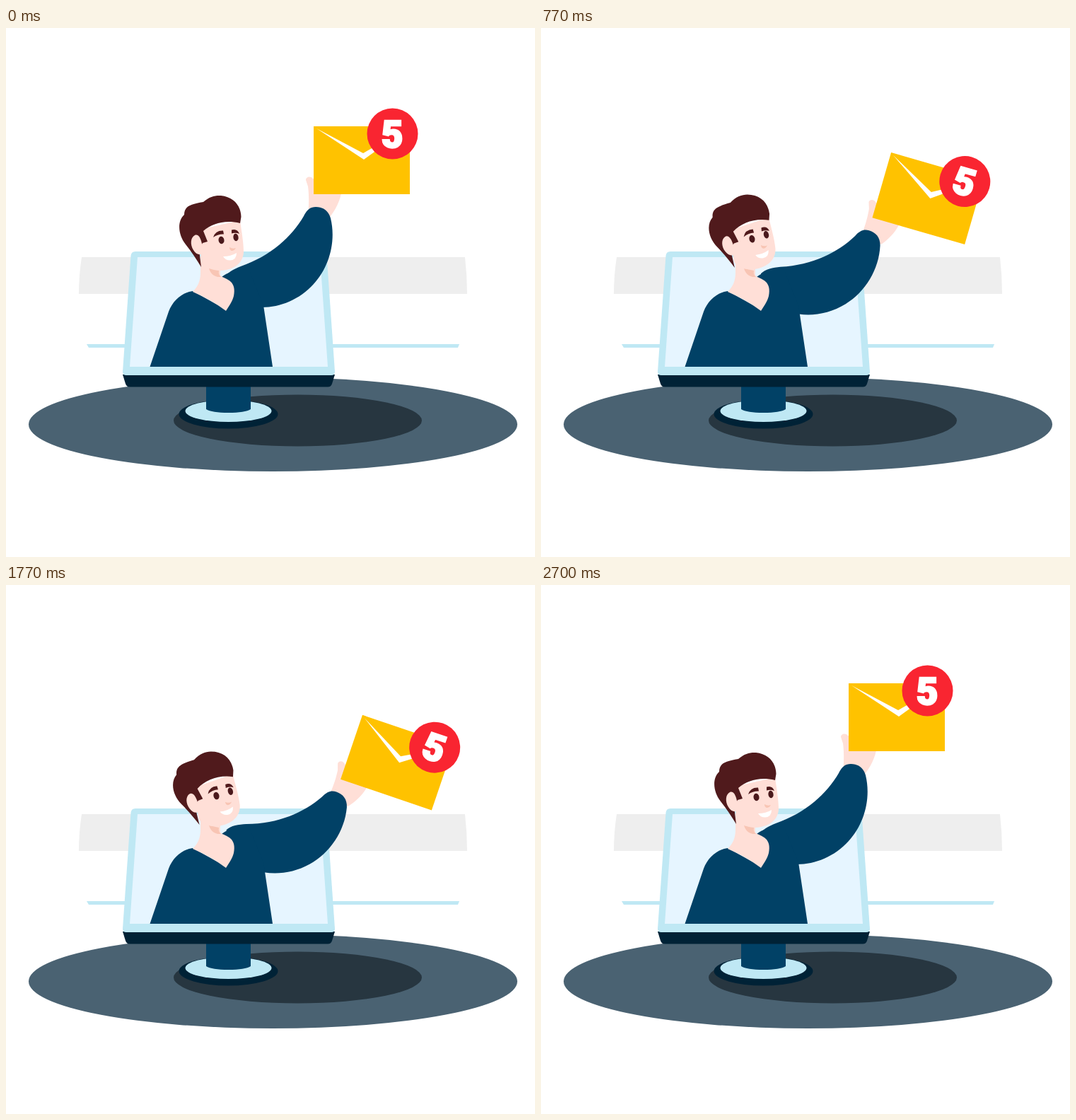
Write an HTML page that moves like this. It is 748 by 748 pixels and loops after 2730 ms.

```html
<!DOCTYPE html>
<html lang="en">
<head>
<meta charset="utf-8">
<title>New mail</title>
<style>
  html, body { margin: 0; width: 100%; height: 100%; overflow: hidden; background: #fff; }
  svg { display: block; width: 100%; height: 100%; }
  .navy { fill: #014166; }
  .ink { fill: #002236; }
  .ice { fill: #bfe8f4; }
  .skin { fill: #ffdfd7; }
  .blush { fill: #f8c5b4; }
  .hair { fill: #501a1c; }
  text { font: 900 53px Roboto, "Open Sans", sans-serif; text-anchor: middle; fill: #fff; stroke: #fff; stroke-width: 2.5px; }
</style>
</head>
<body>
<svg viewBox="0 0 748 748">
  <!-- Room -->
  <path fill="#eee" d="M107 324H649Q652 350 652 376H103Q103 350 107 324Z"/>
  <path class="ice" d="M114 447H641L639 452H117Z"/>
  <ellipse cx="377.5" cy="560.5" rx="345.5" ry="66.5" fill="#4a6272"/>
  <ellipse cx="412.5" cy="555" rx="175.5" ry="36.5" fill="#273640"/>

  <!-- Monitor -->
  <ellipse class="ink" cx="314.5" cy="546" rx="70" ry="20.5"/>
  <ellipse class="ice" cx="314.5" cy="541.5" rx="61" ry="15.5"/>
  <path class="navy" d="M283 505H346V539Q338 544 314.5 544T283 539Z"/>
  <path class="ink" d="M165 490H465L461 503Q459.500 507.500 455 507.500H175Q170.500 507.500 169 503Z"/>
  <path class="ice" d="M183 316H447Q453 316 453.500 322L465 486Q465 491 460 491H170Q165 491 165 486L176.500 322Q177 316 183 316Z"/>
  <path fill="#e6f5ff" d="M186 324H444L455 479H175Z"/>

  <!-- Raised arm with the envelope -->
  <g id="hand">
    <path class="skin" d="M424 215C424 210 431 209 434 213L440 215V234H474C471 248 465 258 458 267L440 275L427 264C429 245 428 232 427 224Z"/>
    <path fill="#ffc200" d="M435 139H571V235H435Z"/>
    <path fill="#fff" d="M439 142L505 177L567 142L506 186Z"/>
    <circle cx="546.500" cy="149.500" r="36" fill="#f92531"/>
    <text x="546" y="168.500">5</text>
  </g>
  <path id="sleeve" class="navy" d="M308 354C312 346 322 341 332 337C375 322 404 295 421 266C426 256 431 253 438 253C448 253 456 258 459 269C467 302 457 338 435 362C415 384 388 395 362 395L330 395Z"/>

  <!-- Torso and neck -->
  <path class="navy" d="M264 372C249 374 236 385 230 401L203.500 479H377L364 392L345 345H319Q311 347 305 352L311 398Z"/>
  <path class="skin" d="M275 322V346C275 358 271 366 264 373Q290 384 311 400C316 392 320 387 322 379C324 369 322 363 318 359C313 354 306 353 303 350V335Z"/>
  <path class="blush" d="M287 340L301 343Q300 349 304 352Q291 353 287 340Z"/>

  <g id="head">
    <path class="skin" d="M274 285L331 272C333 288 336 302 336 317C335 333 322 342 304 343C292 343 282 339 276 330Z"/>
    <path class="hair" d="M252 264C252 252 261 249 279 246C288 238 296 236.500 304 237C322 239 332 251 332.500 267L331 276C310 271 292 276 279 287L285 302L278 304L273 314L276 338C270 328 262 316 254 306C243 292 242 273 252 264Z"/>
    <path class="skin" d="M277 305C275 295 271 291 267 293C261 296 260 306 265 314C268 319 272 321 276 320L281 312Z"/>
    <path class="hair" d="M293 296Q296 286 307 286.500L308 291.500Q300 291 293 296ZM319 285.500Q327 283 330 291Q325 289 319 290.500Z"/>
    <g fill="#4a191c">
      <ellipse cx="304.500" cy="300" rx="4" ry="5.300" transform="rotate(-8 304.500 300)"/>
      <ellipse cx="325" cy="296" rx="3.600" ry="5.300" transform="rotate(-8 325 296)"/>
    </g>
    <path class="blush" d="M316 310Q321 313 325 311Q323 315 319 315Q316 314 316 310Z"/>
    <path fill="#fff" d="M307 323Q318 323 326 318Q326 328 317 328.500Q310 328.500 307 323Z"/>
  </g>
</svg>
<script>
  const LOOP = 2730, LOWERED = 1310, RAISED = 2680;
  const ease = u => u * u * (3 - 2 * u);

  // Angle at the lowered pose, then the pivot.
  const joints = {
    hand: [25.5, 334, 370],
    sleeve: [25.5, 333, 361],
    head: [-9, 284, 360],
  };

  function swing(t) {
    if (t < LOWERED) return ease(t / LOWERED);
    return ease(Math.max(0, (RAISED - t) / (RAISED - LOWERED)));
  }

  function draw() {
    const s = swing(performance.now() % LOOP);
    for (const [id, [angle, x, y]] of Object.entries(joints)) {
      document.getElementById(id).setAttribute("transform", `rotate(${angle * s} ${x} ${y})`);
    }
    requestAnimationFrame(draw);
  }
  draw();
</script>
</body>
</html>
```
